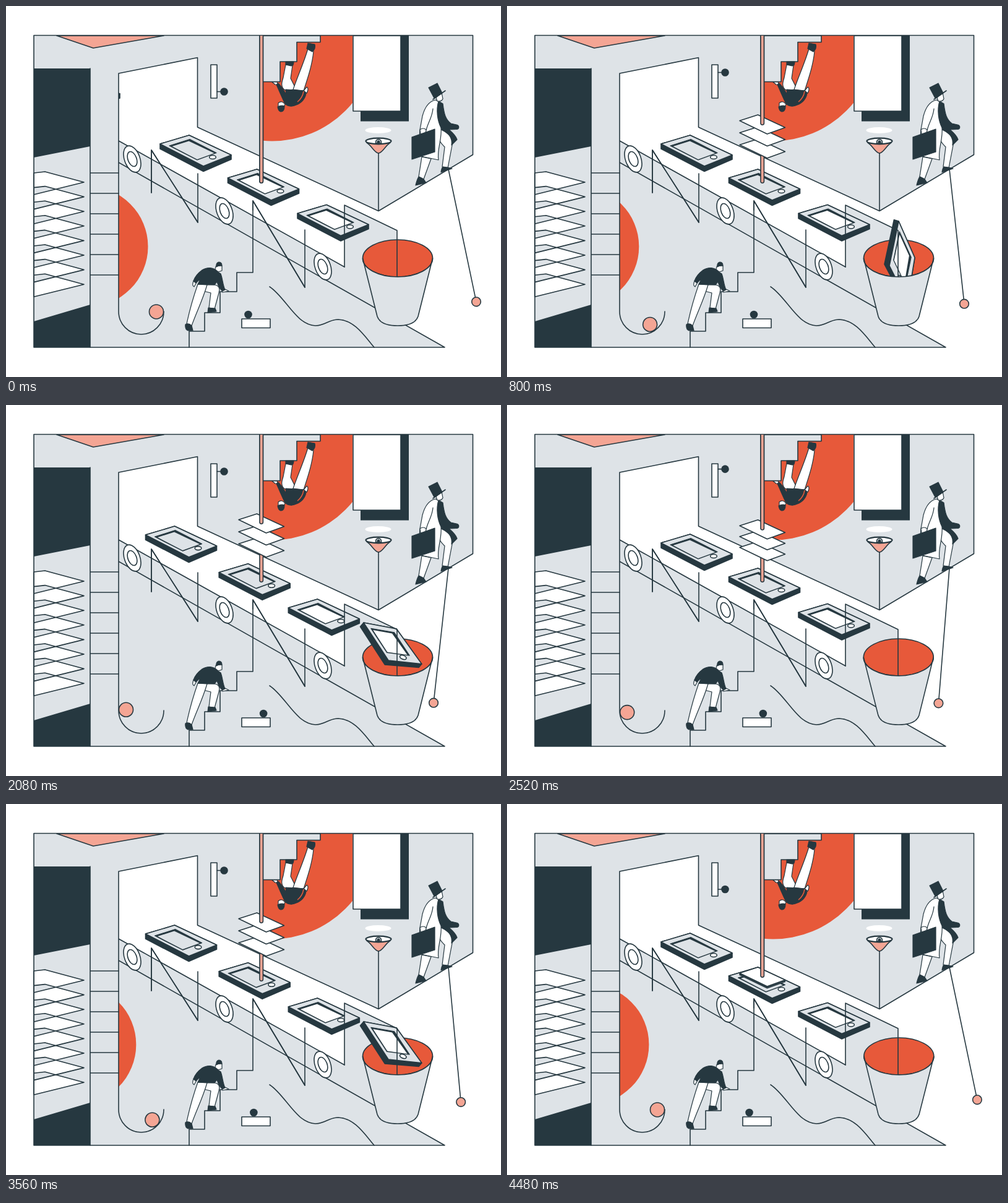
Write an HTML page that moves like this. It is 800 by 600 pixels and loops after 4520 ms.

```html
<!DOCTYPE html>
<html lang="en">
<head>
<meta charset="utf-8">
<title>Conveyor</title>
<style>
html, body { margin: 0; width: 100%; height: 100%; overflow: hidden; background: #fff; }
svg { display: block; width: 800px; height: 600px; }
.d { fill: #263840; }
.g { fill: #dee3e7; }
.o { fill: #e7593a; }
.p { fill: #f4a594; }
.w { fill: #fff; }
.n { fill: none; }
.s { stroke: #263840; stroke-width: 1.6; stroke-linejoin: round; stroke-linecap: round; }
.t { stroke-width: 1.2; }
</style>
</head>
<body>
<svg viewBox="0 0 800 600">
  <defs>
    <clipPath id="right"><path d="M182 48H800V600H182z"/></clipPath>
    <clipPath id="sunBox"><path d="M415 48H560V230H415z"/></clipPath>
    <g id="phone">
      <path class="d s" vector-effect="non-scaling-stroke" d="M0 0V8L70 44.500L115 25V18L47 -14z"/>
      <path class="g s" vector-effect="non-scaling-stroke" d="M0 0L47 -14L115 18L70 36z"/>
      <path class="d s t" vector-effect="non-scaling-stroke" d="M15 3L48 -7.500L91 14.500L60 26z"/>
      <path fill="currentColor" d="M19.500 4L46.500 -4.500L87.500 15L60 25z"/>
      <ellipse class="w s" vector-effect="non-scaling-stroke" cx="85" cy="21.500" rx="5.300" ry="3"/>
    </g>
    <path id="sheet" class="w s" d="M-36.500 -6L-7 -15.500L37 5L8 15.500z"/>
    <g id="wheel">
      <ellipse class="w s" rx="12.500" ry="22.300" transform="rotate(-20)"/>
      <ellipse class="w s" rx="7" ry="12.500" transform="rotate(-20)"/>
    </g>
  </defs>

  <!-- room -->
  <path class="g" d="M45 48H754V241L602 331L309 196L182 218V253L709 552H45z"/>
  <path class="g" d="M182 218L547 422V322L632 363V508L182 253z"/>
  <path class="w" d="M182 109L309 84V196L602 331L632 363L547 322V422L182 218z"/>
  <circle id="disc" class="o" cy="389" r="97" clip-path="url(#right)"/>
  <path class="p s" d="M82 48H255L141 68z"/>

  <!-- left shaft -->
  <path class="d" d="M45 101H136V227L45 245zM45 510L136 483V552H45z"/>
  <path id="pile" class="w s" fill-rule="evenodd"/>
  <path class="n s" d="M136 101V552M136 270H182M136 303H182M136 336H182M136 369H182M136 402H182M136 435H182"/>

  <!-- upper right -->
  <circle class="o" cx="430" cy="51" r="167.500" clip-path="url(#sunBox)"/>
  <path class="g s" d="M415 48V122.500H443V90H470V58.500H508V48z"/>
  <path class="d" d="M573 48H651V186.500H573z"/>
  <path class="w s" d="M561 48H638V170H561z"/>
  <ellipse class="w" cx="601.500" cy="201" rx="21" ry="5"/>
  <path class="p s" d="M583 221C591 226 596 238 602 238C608 238 613 226 621 221z"/>
  <ellipse class="w s" cx="602" cy="218.500" rx="20.500" ry="4.800" style="stroke-width:2.2"/>
  <path class="g s" d="M597.500 222Q597 216 602 215.500Q607 216 606.500 222z"/>
  <circle class="d" cx="602" cy="220" r="2.600"/>
  <path class="n s" d="M602 238V331"/>

  <!-- outlines -->
  <path class="n s" d="M309.500 196L602 331.500L754.500 240.500V47.500H45V552H709L182 253M182 109L309.500 83.500V196M182 218L547 422M182 109V494A36.500 37 0 0 0 255 494"/>
  <path class="n s" d="M426 454C452 471 469 516 500 517C516 517 521 507 537 507C563 508 579 533 595 552"/>

  <!-- upside-down climber -->
  <g class="s t">
    <path class="w" d="M452 95L463 96L460 117L469 135L451 136C443 131 446 122 448 116z"/>
    <path class="w" d="M488 69L497 73C495 95 488 115 481 137L464 135C472 112 482 90 488 69z"/>
    <path class="d" d="M488 60L499 62Q501 69 495 74L486 69zM452 90H465Q465 97 461 97L452 95z"/>
    <path class="w" d="M481 137L486 131Q490 133 486 141zM430 123L438 123L440 128L435 127z"/>
    <path class="d" d="M452 135L481 137L485 141C484 149 478 157 469 160C461 164 453 162 450 156C446 148 441 136 437 127L440 125C446 131 450 139 453 143z"/>
    <path class="w" d="M440 157Q446 152 451 159L447 167L440 165z"/>
    <path class="d" d="M439 163Q445 160 450 162Q450 171 444 171Q440 170 439 163z"/>
  </g>
  <path fill="none" stroke="#e7593a" stroke-width="1.500" d="M481 138Q479 149 471 155"/>

  <!-- man with hat -->
  <g class="s t">
    <path class="w" d="M672 244L667 276L675 280L687 247z"/>
    <path class="w" d="M703 200C716 205 723 214 721 225L714 262L705 260L709 228C703 222 699 218 700 208z"/>
    <path class="d" d="M699 154L706 158C708 174 710 183 719 190L728 192C733 193 733 199 728 199.500L716 200C722 205 727 210 729 216L720 225C722 212 715 206 704 200C696 190 694 168 699 154z"/>
    <path class="w" d="M694 152C684 154 677 163 673 178L669 200L666 242L699 249C696 232 705 216 703 197C697 185 695 168 699 154z"/>
    <path class="n" d="M690 166C689 180 682 188 679 201"/>
    <path class="w" d="M669 200Q674 196 679 200L678 207H670z"/>
    <path class="d" d="M656 212L693 199V236L656 248z"/>
    <path class="d" d="M662 290Q664 281 667 276L675 280L679 286zM703 269Q704 262 706 260L714 261L721 263z"/>
    <path class="w" d="M695 148L704 140L706 150Q704 155 697 154z"/>
    <path class="d" d="M683 132L697 125L705 141L692 149z"/>
    <path class="n s" d="M690 151L710 137"/>
  </g>

  <!-- stairs and climber -->
  <path class="n s" d="M296 552V526H321V496H346V462H373V431H399V315L483 455V362M235 302V233L310 350V271"/>
  <g class="s t">
    <path class="w" d="M317 451H337C345 452 346 458 344 464L337 490L328 488L331 464L319 461z"/>
    <path class="w" d="M310 450L325 451C318 475 308 495 300 517L292 514C297 490 303 470 310 450z"/>
    <path class="d" d="M327 488L338 489L340 494L326 496zM290 515Q295 512 300 517L302 525H294Q289 523 290 515z"/>
    <path class="w" d="M303 444L308 447L304 454Q300 452 303 445zM349 461L354 458L360 461L350 463z"/>
    <path class="d" d="M342 430C336 422 325 422 317 427C309 433 305 438 303 445L307 448L315 440L310 450L337 451L341 446C343 453 346 458 350 461L354 459C350 450 350 440 347 433z"/>
    <path class="w" d="M339 421L349 420V428L343 430L338 426z"/>
    <path class="d" d="M340 422Q339 415 344 414Q349 414 349 420Q344 419 340 422z"/>
  </g>

  <use href="#wheel" x="204" y="247.500"/>
  <use href="#wheel" x="353" y="331.500"/>
  <use href="#wheel" x="512" y="421.500"/>

  <!-- moving parts -->
  <path class="w s" d="M331 95H341V149H331z"/>
  <g id="knob"><path class="n s" d="M341 0H348"/><circle class="d" cx="352.500" r="6.300"/></g>
  <path class="w s" d="M381 506H427V520.500H381z"/>
  <circle id="dot" class="d" cy="499" r="6.300"/>
  <circle id="ball" class="p s" r="11.500"/>
  <path id="string" class="n s"/>
  <circle id="bob" class="p s" r="7.300"/>
  <g id="belt" clip-path="url(#right)"></g>
  <path class="n s" d="M235 302V233L310 350M399 330V315L483 455"/>
  <ellipse id="binTop" class="o s" cx="633" cy="408" rx="56.500" ry="30"/>
  <g id="drop"></g>
  <path class="n s" d="M547 422V322L632 363V438"/>
  <path id="binBody" class="g s" d="M576.500 408L600 502Q605 517 633 517Q661 517 666 502L689.500 408A56.500 30 0 0 1 576.500 408z"/>
  <path class="p s" d="M410 48V283.500A2.700 2.700 0 0 0 415.400 283.500V48"/>
  <g id="sheets"></g>
  <path id="rod" class="p s"/>
</svg>
<script>
const $ = id => document.getElementById(id);
const set = (el, attrs) => { for (const a in attrs) el.setAttribute(a, attrs[a]); };
const make = (parent, tag, attrs) => {
  const el = document.createElementNS('http://www.w3.org/2000/svg', tag);
  set(el, attrs);
  return parent.appendChild(el);
};
const clamp = x => Math.max(0, Math.min(1, x));
const ease = x => (1 - Math.cos(Math.PI * clamp(x))) / 2;
const mix = (a, b, p) => a + (b - a) * p;

// Smooth curve through [step, value] keys, flat at the turning points.
function curve(keys, x) {
  const last = keys.length - 1;
  if (x <= keys[0][0]) return keys[0][1];
  if (x >= keys[last][0]) return keys[last][1];
  const i = keys.findIndex(k => k[0] > x) - 1;
  const rise = j => (keys[j + 1][1] - keys[j][1]) / (keys[j + 1][0] - keys[j][0]);
  const slope = j => {
    if (j === 0 || j === last) return 0;
    const a = rise(j - 1), b = rise(j);
    return a * b <= 0 ? 0 : 2 * a * b / (a + b);
  };
  const [x0, a] = keys[i], [x1, b] = keys[i + 1];
  const h = x1 - x0, p = (x - x0) / h, q = 1 - p;
  return a * (1 + 2 * p) * q * q + b * p * p * (3 - 2 * p) + h * p * q * (slope(i) * q - slope(i + 1) * p);
}

const STEP = 40, STEPS = 113;
const SWING = [[0, 1], [14, .72], [20, .4], [28, -.04], [35, -.42], [45, -.84], [52, -.97], [56, -1],
  [64, -.75], [74, -.34], [84, .08], [89, .29], [98, .61], [106, .9], [113, 1]];
const ROLL = [[0, 1], [20, 59], [35, 148], [52, 183], [56, 184], [74, 131], [89, 43], [112, 1]];
const KNOB = [[0, 138.5], [6, 102.3], [9, 107.5], [22, 107.5], [25, 102.3], [33, 132.5], [35, 137], [37, 138.5]];
const SHAKE = [[18, 0], [22, -.9], [27, 1.3], [33, 1.05], [35, .5], [37, 0]];
const SLOTS = [[69, 124], [249, 223], [358.5, 278], [471, 335.5]];
// step, corner x, y, short edge, long edge
const FALL = [
  [0, 471, 335.5, 47, -14, 70, 36],
  [9, 524, 354, 50, -8, 66, 42],
  [13, 578, 352, 53, 10, 40, 61],
  [18, 633, 348, 26, 59, -15, 72],
  [22, 640, 446, 14, 26, -10, 36]
];

let pile = '';
for (let y = 0; y < 8; y++) pile += `M45 ${270 + y * 23.6}l18 -2l63 17l-81 20z`;
set($('pile'), { d: pile });

const phone = (parent, color) => make(parent, 'use', { href: '#phone', color });
const phones = ['#dee3e7', '#dee3e7', '#fff'].map(c => phone($('belt'), c));
const faller = phone($('drop'), '#fff');
const sheets = [2, 1, 0].map(n => ({ n, el: make($('sheets'), 'use', { href: '#sheet' }) }));

// Maps the resting edges (47, -14) and (70, 36) onto the falling ones.
function fallMatrix(k) {
  const [x, y, ux, uy, vx, vy] = [1, 2, 3, 4, 5, 6].map(c => curve(FALL.map(r => [r[0], r[c]]), k));
  const det = 47 * 36 + 14 * 70;
  const a = (36 * ux + 14 * vx) / det, b = (36 * uy + 14 * vy) / det;
  const c = (47 * vx - 70 * ux) / det, d = (47 * vy - 70 * uy) / det;
  return `matrix(${a} ${b} ${c} ${d} ${x} ${y})`;
}

function draw(f) {
  const s = curve(SWING, f);
  const bx = 10 + 35 * s, by = Math.sqrt(219 * 219 - bx * bx);
  set($('string'), { d: `M715 264L${715 + bx} ${264 + by}` });
  set($('bob'), { cx: 715 + bx, cy: 264 + by });
  set($('disc'), { cx: 105.5 + 27 * s });
  set($('dot'), { cx: 404 - 12.5 * s });
  const r = curve(ROLL, f) * Math.PI / 180;
  set($('ball'), { cx: 218.5 + 24.5 * Math.cos(r), cy: 494 + 24.5 * Math.sin(r) });

  // the first of three work cycles starts with a short rest
  const k = f < 39 ? Math.max(0, f - 2) : (f - 39) % 37;
  const e = ease(k / 17);
  phones.forEach((el, i) => {
    const [a, b] = [SLOTS[i], SLOTS[i + 1]];
    set(el, { transform: `translate(${mix(a[0], b[0], e)} ${mix(a[1], b[1], e)})` });
  });
  set(faller, { transform: fallMatrix(k), visibility: k < 22 ? 'visible' : 'hidden' });
  set($('knob'), { transform: `translate(0 ${curve(KNOB, k)})` });
  const tilt = `rotate(${curve(SHAKE, k)} 633 517)`;
  set($('binTop'), { transform: tilt });
  set($('binBody'), { transform: tilt });

  const down = clamp((k - 22.5) / 14.5);
  const y = mix(191.5, 286, down), size = ease((k - 3) / 8);
  for (const { n, el } of sheets)
    set(el, { transform: `translate(412.500 ${y + n * 19.5 * (1 - down)}) scale(${size})` });
  const tip = size > 0 ? y - 2 : 283.5;
  set($('rod'), { d: `M410 48V${tip}A2.700 2.700 0 0 0 415.400 ${tip}V48` });
}

function tick() {
  draw(Math.floor(performance.now() / STEP) % STEPS);
  requestAnimationFrame(tick);
}
tick();
</script>
</body>
</html>
```
